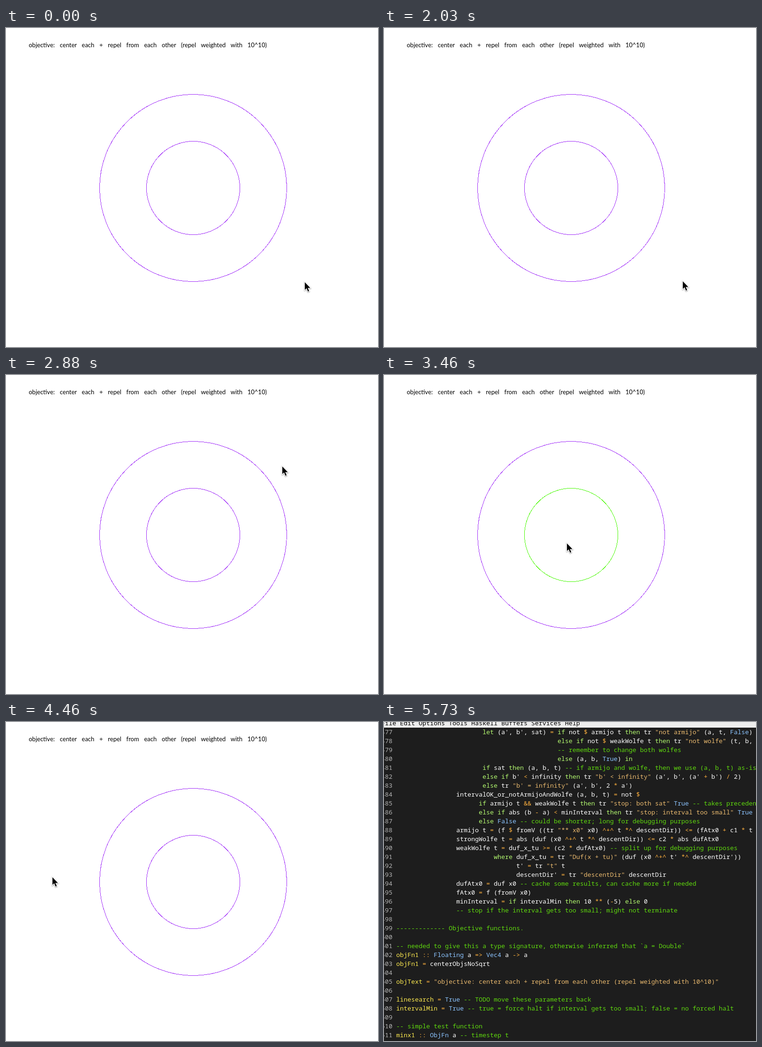
Write an HTML page that moves like this. It is 793 px wide and 680 px high and loops after 8000 ms.

```html
<!DOCTYPE html>
<html lang="en">
<head>
<meta charset="utf-8">
<title>Centering two circles</title>
<style>
  html, body { margin: 0; width: 100%; height: 100%; overflow: hidden; background: #fff; }
  svg, #editor { position: absolute; left: 0; top: 0; width: 793px; height: 680px; overflow: hidden; }
  circle { fill: none; shape-rendering: crispEdges; }
  #label { font: 13px Lato, sans-serif; word-spacing: 7.4px; }
  #cursor { fill: #000; stroke: #fff; stroke-width: 2.4; paint-order: stroke;
            filter: drop-shadow(0 1px 1.2px rgba(0, 0, 0, .45)); }
  #editor { background: #1d1d1d; }
  #menu, #code { position: absolute; left: -6px; margin: 0; white-space: pre;
                 font: 13.333px/19px "Noto Sans Mono", monospace; font-variant-ligatures: none; }
  #bar { height: 12px; background: #ededed; }
  #menu { top: -7px; color: #000; }
  #code { top: 12px; color: #fff; }
  .number { color: #b4b4b4; }
  .name { color: #fce94f; }
  .comment { color: #5fd80e; }
  .string { color: #e9b96e; }
  .keyword { color: #b4fa70; }
  .type { color: #8cc4ff; }
  .operator { color: #fcaf3e; }
</style>
</head>
<body>
<svg>
  <text id="label" x="48.5" y="41">objective: center each + repel from each other (repel weighted with 10^10)</text>
  <circle id="outer" cx="399" cy="341" r="199.5"/>
  <circle id="inner" cx="399" cy="341" r="99.5"/>
</svg>
<div id="editor">
  <div id="bar"><div id="menu">File Edit Options Tools Haskell Buffers Services Help</div></div>
  <pre id="code">
                       let (a', b', sat) = if not $ armijo t then tr "not armijo" (a, t, False)
                                           else if not $ weakWolfe t then tr "not wolfe" (t, b, True)
                                           -- remember to change both wolfes
                                           else (a, b, True) in
                       if sat then (a, b, t) -- if armijo and wolfe, then we use (a, b, t) as-is
                       else if b' < infinity then tr "b' < infinity" (a', b', (a' + b') / 2)
                       else tr "b' = infinity" (a', b', 2 * a')
                intervalOK_or_notArmijoAndWolfe (a, b, t) = not $
                      if armijo t && weakWolfe t then tr "stop: both sat" True -- takes precedence
                      else if abs (b - a) < minInterval then tr "stop: interval too small" True
                      else False -- could be shorter; long for debugging purposes
                armijo t = (f $ fromV ((tr "** x0" x0) ^+^ t *^ descentDir)) <= (fAtx0 + c1 * t *
                strongWolfe t = abs (duf (x0 ^+^ t *^ descentDir)) <= c2 * abs dufAtx0
                weakWolfe t = duf_x_tu >= (c2 * dufAtx0) -- split up for debugging purposes
                          where duf_x_tu = tr "Duf(x + tu)" (duf (x0 ^+^ t' *^ descentDir'))
                                t' = tr "t" t
                                descentDir' = tr "descentDir" descentDir
                dufAtx0 = duf x0 -- cache some results, can cache more if needed
                fAtx0 = f (fromV x0)
                minInterval = if intervalMin then 10 ** (-5) else 0
                -- stop if the interval gets too small; might not terminate

------------- Objective functions.

-- needed to give this a type signature, otherwise inferred that `a = Double`
objFn1 :: Floating a => Vec4 a -> a
objFn1 = centerObjsNoSqrt

objText = "objective: center each + repel from each other (repel weighted with 10^10)"

linesearch = True -- TODO move these parameters back
intervalMin = True -- true = force halt if interval gets too small; false = no forced halt

-- simple test function
minx1 :: ObjFn a -- timestep t</pre>
</div>
<svg><path id="cursor" d="M0 0V16L3.8 12.7 6.7 19.8 9.2 18.8 6.3 11.9H11.6Z"/></svg>
<script>
const $ = id => document.getElementById(id);
const LOOP = 8000, EDITOR_AT = 4990, CURSOR_GONE = 5730;
const PURPLE = '#a02cf8', GREEN = '#48f800';

// Syntax colouring
const token = /(?<comment>--.*)|(?<string>"[^"]*")|(?<name>^\w+)|\b(?<keyword>let|if|then|else|in|where)\b|\b(?<type>[A-Z]\w*)|(?<operator>[-+*\/=<>$&^:]+)/g;
const escapeHtml = s => s.replace(/&/g, '&amp;').replace(/</g, '&lt;');
const span = (kind, s) => `<span class="${kind}">${escapeHtml(s)}</span>`;
const colour = line => line.replace(token, (match, ...rest) => {
  const groups = rest.at(-1);
  return span(Object.keys(groups).find(kind => groups[kind]), match);
});
$('code').innerHTML = $('code').textContent.split('\n')
  .map((line, i) => span('number', `${477 + i}`) + ' ' + colour(line)).join('\n');

// Cursor path: time, x, y
const path = [
  [0, 637, 542], [180, 637, 542], [270, 637, 540], [2030, 637, 540],
  [2400, 558, 420], [2500, 556, 390], [2820, 590, 195], [2880, 590, 195],
  [3110, 450, 300], [3290, 450, 300], [3460, 390, 359], [3750, 298, 345],
  [4050, 298, 345], [4460, 99, 331], [5410, 99, 331], [5670, 717, 668], [LOOP, 717, 668]
];

function cursorAt(t) {
  const i = path.findIndex(p => p[0] > t);
  const [t0, x0, y0] = path[i - 1], [t1, x1, y1] = path[i];
  const k = (t - t0) / (t1 - t0);
  return [x0 + (x1 - x0) * k, y0 + (y1 - y0) * k].map(Math.round);
}

// A circle is green while it is held down
const hold = (id, t, from, to) =>
  $(id).setAttribute('stroke', t >= from && t < to ? GREEN : PURPLE);

function draw() {
  const t = performance.now() % LOOP;
  hold('outer', t, 2450, 2880);
  hold('inner', t, 3350, 4110);
  $('editor').style.display = t < EDITOR_AT ? 'none' : 'block';
  $('cursor').style.display = t < CURSOR_GONE ? 'block' : 'none';
  $('cursor').setAttribute('transform', `translate(${cursorAt(t)})`);
  requestAnimationFrame(draw);
}
draw();
</script>
</body>
</html>
```
